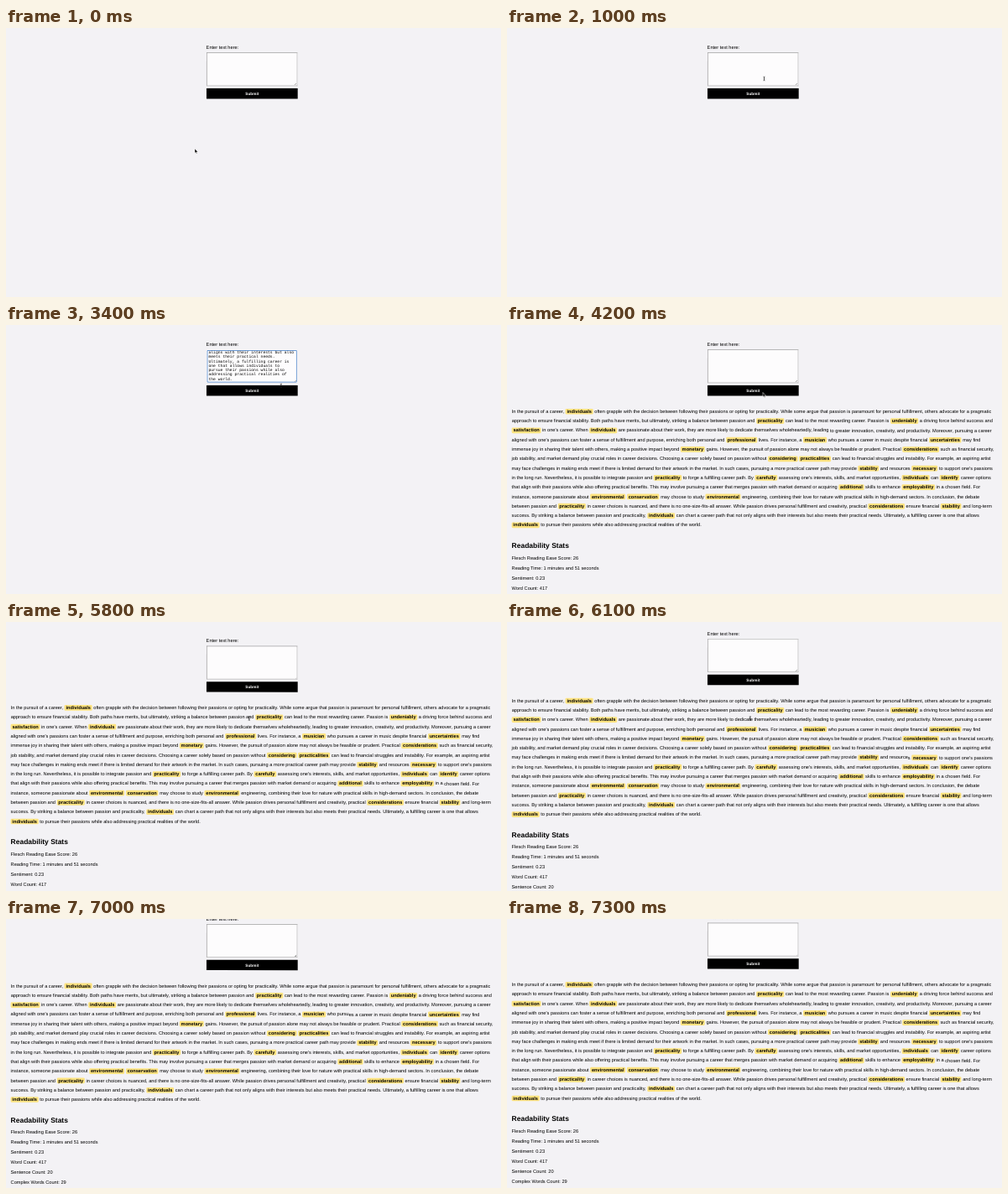
Recreate the animation shown at these times as an HTML page. Size 590 by 321 pixels, loop 8 s.

```html
<!DOCTYPE html>
<html lang="en">
<head>
<meta charset="utf-8">
<title>Readability form</title>
<style>
html, body { margin: 0; width: 100%; height: 100%; overflow: hidden; background: #f3f2f5; }
#stage { position: relative; width: 100%; height: 100%; overflow: hidden; contain: strict; }
#page { position: absolute; width: 1672px; height: 1000px; transform-origin: 0 0;
  font: 16px/18px "Liberation Sans", Arial, sans-serif; color: #000; text-rendering: geometricPrecision; }
#page > * { position: absolute; margin: 0; box-sizing: border-box; white-space: pre; }
#label { left: 676px; top: 58px; }
#box { left: 677px; top: 83px; width: 307px; height: 113px; padding: 3px 5px; overflow: hidden;
  display: flex; border: 2px solid; border-color: #a0a0a0 #b8b8b8 #b8b8b8 #a0a0a0; background: #fdfcfd;
  font: 13.33px/15px "Liberation Mono", monospace; }
#box.focus { border-color: transparent; border-radius: 4px; }
#box.focus::before { content: ""; position: absolute; inset: -2px; border: 4px solid #3b78c4; border-radius: 4px; }
#box.filled { align-items: flex-end; }
#box::after { content: ""; position: absolute; right: 1px; bottom: 1px; width: 7px; height: 7px;
  background: linear-gradient(135deg, #0000 50%, #aaa 50% 62%, #0000 62% 76%, #aaa 76% 88%, #0000 88%); }
#typed { white-space: pre-wrap; }
#caret { border-left: 2px solid #000; margin-right: -2px; }
#submit { left: 677px; top: 204px; width: 308px; height: 35px; background: #000;
  color: #fff; font-weight: bold; font-size: 13.33px; line-height: 35px; text-align: center; }
#essay { left: 16px; top: 277px; line-height: 32px; }
#essay b { padding: 1px 5px; border-radius: 4px; background: #fde380; }
h2 { left: 16px; top: 732px; font-size: 24px; line-height: 28px; }
#stats { left: 16px; top: 771px; line-height: 34px; }
#pointer { position: absolute; left: 0; top: 0; overflow: visible; }
</style>
</head>
<body>
<div id="stage">
  <div id="page">
    <div id="label">Enter text here:</div>
    <div id="box"><div><span id="typed"></span><span id="caret"></span></div></div>
    <div id="submit">Submit</div>
    <p id="essay" class="result"></p>
    <h2 class="result">Readability Stats</h2>
    <div id="stats" class="result">Flesch Reading Ease Score: 26
Reading Time: 1 minutes and 51 seconds
Sentiment: 0.23
Word Count: 417
Sentence Count: 20
Complex Words Count: 29</div>
  </div>
  <svg id="pointer" width="8" height="8">
    <path id="arrow" d="M0 0V5.2L1.2 4.2L2 6L2.9 5.6L2.1 3.9H3.7Z" stroke="#fff" stroke-width=".5"/>
    <path id="beam" d="M-1 -2.4Q0 -2.4 0 -1.8V1.8Q0 2.4 -1 2.4M1 -2.4Q0 -2.4 0 -1.8V1.8Q0 2.4 1 2.4" fill="none" stroke="#222" stroke-width=".55"/>
  </svg>
</div>
<script>
const LOOP = 8000, STEP = 100, SCALE = 0.353;
const essay = `In the pursuit of a career, *individuals* often grapple with the decision between following their passions or opting for practicality. While some argue that passion is paramount for personal fulfillment, others advocate for a pragmatic
approach to ensure financial stability. Both paths have merits, but ultimately, striking a balance between passion and *practicality* can lead to the most rewarding career. Passion is *undeniably* a driving force behind success and
*satisfaction* in one's career. When *individuals* are passionate about their work, they are more likely to dedicate themselves wholeheartedly, leading to greater innovation, creativity, and productivity. Moreover, pursuing a career
aligned with one's passions can foster a sense of fulfillment and purpose, enriching both personal and *professional* lives. For instance, a *musician* who pursues a career in music despite financial *uncertainties* may find
immense joy in sharing their talent with others, making a positive impact beyond *monetary* gains. However, the pursuit of passion alone may not always be feasible or prudent. Practical *considerations* such as financial security,
job stability, and market demand play crucial roles in career decisions. Choosing a career solely based on passion without *considering* *practicalities* can lead to financial struggles and instability. For example, an aspiring artist
may face challenges in making ends meet if there is limited demand for their artwork in the market. In such cases, pursuing a more practical career path may provide *stability* and resources *necessary* to support one's passions
in the long run. Nevertheless, it is possible to integrate passion and *practicality* to forge a fulfilling career path. By *carefully* assessing one's interests, skills, and market opportunities, *individuals* can *identify* career options
that align with their passions while also offering practical benefits. This may involve pursuing a career that merges passion with market demand or acquiring *additional* skills to enhance *employability* in a chosen field. For
instance, someone passionate about *environmental* *conservation* may choose to study *environmental* engineering, combining their love for nature with practical skills in high-demand sectors. In conclusion, the debate
between passion and *practicality* in career choices is nuanced, and there is no one-size-fits-all answer. While passion drives personal fulfillment and creativity, practical *considerations* ensure financial *stability* and long-term
success. By striking a balance between passion and practicality, *individuals* can chart a career path that not only aligns with their interests but also meets their practical needs. Ultimately, a fulfilling career is one that allows
*individuals* to pursue their passions while also addressing practical realities of the world.`;
const plain = essay.replace(/\*/g, "").replace(/\n/g, " ");

// Keys: time, then values
const pointerKeys = [[0, 225, 144], [100, 262, 110], [200, 291.5, 82], [400, 291.5, 82], [700, 298, 60],
  [800, 298, 60], [1400, 323.5, 61.3], [3200, 323.5, 61.3], [3500, 330, 78], [3800, 314, 86], [4100, 305, 80.5],
  [4800, 305, 80.5], [4900, 302, 96], [5000, 297, 111], [5100, 297, 111], [5200, 300, 114.5],
  [5700, 300, 114.5], [5800, 289.8, 115]];
const scrollKeys = [[5700, 0], [5800, 0.8], [6000, 5.3], [6100, 9.2], [6200, 15.5], [6300, 21.5],
  [6800, 21.5], [7000, 23.3], [7300, 24.8]];

const $ = id => document.getElementById(id);
const show = (el, on) => el.style.visibility = on ? "visible" : "hidden";

function sample(keys, t) {
  const next = keys.findIndex(k => k[0] > t);
  if (next === 0) return keys[0].slice(1);
  if (next < 0) return keys.at(-1).slice(1);
  const a = keys[next - 1], b = keys[next], u = (t - a[0]) / (b[0] - a[0]);
  return a.slice(1).map((v, i) => v + (b[i + 1] - v) * u);
}

$("essay").innerHTML = essay.replace(/\*(\w+)\*/g, "<b>$1</b>");
$("typed").textContent = plain;

function draw() {
  const t = Math.floor(performance.now() % LOOP / STEP) * STEP;
  const focus = t >= 1600 && t < 4200, filled = t >= 2800 && t < 4200;
  $("box").className = (focus ? "focus " : "") + (filled ? "filled" : "");
  $("typed").style.display = filled ? "inline" : "none";
  show($("caret"), focus && Math.floor((t - (filled ? 2800 : 1600)) / 500) % 2 === 0);
  document.querySelectorAll(".result").forEach(el => show(el, t >= 4200));

  const [scroll] = sample(scrollKeys, t), [x, y] = sample(pointerKeys, t);
  // The hair of rotation stops baselines snapping to whole pixels
  $("page").style.transform = `translateY(${-scroll}px) scale(${SCALE}) rotate(0.01deg)`;
  $("pointer").style.transform = `translate(${x}px, ${y}px)`;
  const beam = t >= 600 && t < 3500 || t >= 5200;
  show($("beam"), beam && t < 6900);
  show($("arrow"), !beam);
  requestAnimationFrame(draw);
}
draw();
</script>
</body>
</html>
```
